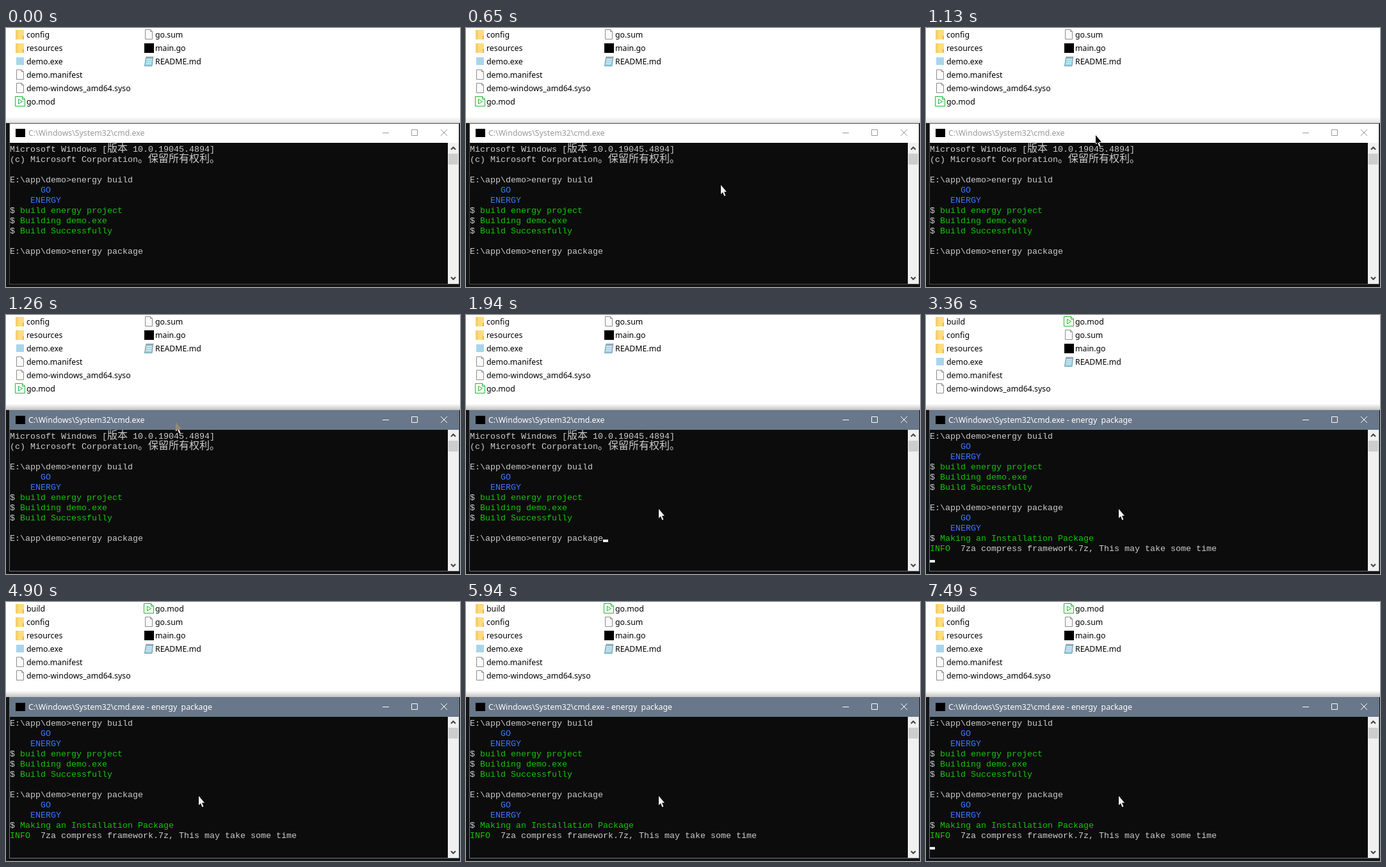
These frames come from a looping animation (709x406 px, 8 s). An HTML page:

```html
<!DOCTYPE html>
<html lang="zh-CN">
<head>
<meta charset="utf-8">
<title>Terminal packaging</title>
<style>
  html, body { margin: 0; width: 100%; height: 100%; overflow: hidden; background: #fff; }
  svg { display: block; }
  text { white-space: pre; }
  .ui { font: 12.32px "Noto Sans", "Open Sans", sans-serif; }
  .con { font: 13.333px "Liberation Mono", "Courier New", monospace; fill: #ccc; }
  .cjk { font: 300 16px "Noto Sans CJK SC", "Noto Sans CJK", sans-serif; }
  .green { fill: #16c60c; }
  .blue { fill: #3b78ff; }
  .cursor { fill: #fff; mix-blend-mode: difference; }
</style>
</head>
<body>
<svg id="stage" width="709" height="406" viewBox="0 0 709 406"></svg>
<script>
const LOOP = 8000;
const ACTIVE = 1260, ENTER = 2670, REFRESH = 3360;
const PRINTS = [2760, 2850, 2940, 3290];
const BLINKS = [1800, 2340, ENTER, 3840, 4370, 4900, 5430, 5940, 6470, 7020, 7490];

const rect = (x, y, w, h, fill, extra = '') =>
  `<rect x="${x}" y="${y}" width="${w}" height="${h}" fill="${fill}" ${extra}/>`;
const path = (d, stroke, fill = 'none', extra = '') =>
  `<path d="${d}" stroke="${stroke}" fill="${fill}" ${extra}/>`;
const label = (x, y, s, fill = '#000') => `<text class="ui" x="${x}" y="${y}" fill="${fill}">${s}</text>`;
const span = (cls, s) => `<tspan class="${cls}">${s}</tspan>`;
const passed = (times, t) => times.filter(at => t >= at).length;

// Icons sit in a 16 by 16 cell
const ICONS = {
  folder: rect(1, 1, 13, 15, '#ffdc7c') + rect(1, 1, 4, 15, '#f7d069') + rect(12, 10, 2, 6, '#e9b94a'),
  page: path('M2.5 .5H10.5L13.5 3.5V15.5H2.5Z', '#8c8c8c', '#fafafa') + path('M10.5 .5V3.5H13.5', '#8c8c8c'),
  app: rect(2, 2, 12, 12, '#a9d5ea'),
  code: rect(1, 1, 15, 15, '#000'),
  play: path('M.5 .5H11.5L15.5 4.5V15.5H.5Z', '#25b532', '#fff') +
    path('M11.5 .5V4.5H15.5', '#25b532') + path('M5.5 4.5V12L11.5 8.2Z', '#25b532'),
  note: path('M3.5 2.5H14.5L13 15.5H1.5Z', '#6f98a8', '#9fd3e6') +
    path('M4 5.5H13M4 8.5H12.5M3.5 11.5H12', '#e2f3f8') +
    path('M4 1.5H15', '#777', 'none', 'stroke-dasharray="1 1" stroke-width="2"')
};

const FILES = [
  ['folder', 'config'], ['folder', 'resources'], ['app', 'demo.exe'],
  ['page', 'demo.manifest'], ['page', 'demo-windows_amd64.syso'], ['play', 'go.mod'],
  ['page', 'go.sum'], ['code', 'main.go'], ['note', 'README.md']
];

const step = s => '$ ' + span('green', s);
const BANNER = [span('blue', '      GO'), span('blue', '    ENERGY')];
const LOG = [
  `Microsoft Windows [${span('cjk', '版本')} 10.0.19045.4894]`,
  `(c) Microsoft Corporation${span('cjk', '。保留所有权利。')}`,
  '',
  'E:\\app\\demo&gt;energy build',
  ...BANNER,
  step('build energy project'),
  step('Building demo.exe'),
  step('Build Successfully'),
  '',
  'E:\\app\\demo&gt;energy package',
  ...BANNER,
  step('Making an Installation Package'),
  span('green', 'INFO') + '  7za compress framework.7z, This may take some time'
];

function explorer(t) {
  const files = t >= REFRESH ? [['folder', 'build'], ...FILES] : FILES;
  return files.map(([icon, name], i) => {
    const x = 14 + 201 * Math.floor(i / 6), y = 2 + 21 * (i % 6);
    return `<g transform="translate(${x} ${y})">${ICONS[icon]}</g>` + label(x + 18, y + 13, name);
  }).join('');
}

function frame(t) {
  const active = t >= ACTIVE;
  const bar = active ? '#687789' : '#fff', ink = active ? '#fff' : '#999';
  const edge = active ? '#687789' : '#4a4a4a';
  const title = 'C:\\Windows\\System32\\cmd.exe' + (t >= ENTER ? ' - energy  package' : '');
  const shadow = `<linearGradient id="shadow" x2="0" y2="1"><stop stop-opacity="0"/>` +
    `<stop offset="1" stop-opacity="${active ? .24 : .12}"/></linearGradient>`;
  return shadow + rect(0, 139, 709, 10, 'url(#shadow)') +
    rect(0, 149, 709, 257, '#141414') +
    rect(5.5, 149.5, 702, 252, '#0c0c0c', `stroke="${edge}"`) +
    rect(6, 150, 701, 30, bar) +
    rect(15, 158, 15, 13, '#000') +
    label(35, 169, title, ink) +
    path('M588 164.5H598M633.5 159.5H642.5V168.5H633.5ZM679 159L689 169M689 159L679 169', ink) +
    rect(690, 180, 17, 221, '#f0f0f0') +
    rect(691, 197, 15, 17, '#cdcdcd') +
    path('M695 190.5L698.5 187L702 190.5M695 390.5L698.5 394L702 390.5', '#404040', 'none', 'stroke-width="2"');
}

function terminal(t) {
  const shown = 11 + passed(PRINTS, t);
  const typing = t < ENTER;
  const caretLine = typing ? 10 : shown;
  const top = Math.max(0, caretLine - 12);
  const lines = LOG.slice(top, shown).map((s, i) =>
    `<text class="con" x="6" y="${194 + 16 * i}">${s}</text>`).join('');
  const caretOn = passed(BLINKS, t) % 2;
  return lines + (caretOn ? rect(typing ? 214 : 6, 192 + 16 * (caretLine - top), 8, 4, '#f2f2f2') : '');
}

// Pointer position, sampled in even steps like a screen recorder
function glide(t, start, gap, steps, from, to, ease) {
  const k = Math.min(1, Math.max(0, Math.floor((t - start) / gap + 1e-6) / steps));
  return from.map((v, i) => Math.round(v + (to[i] - v) * ease(k)));
}

function pointer(t) {
  if (t < 250) return '';
  const [x, y] = t < 1520
    ? glide(t, 250, 820 / 12, 12, [655, 396], [265, 168], k => 1 - (1 - k) ** 2)
    : glide(t, 1520, 70, 6, [265, 168], [301, 304], k => k * k * (3 - 2 * k));
  return `<path class="cursor" transform="translate(${x} ${y})" d="M0 0V14.5L3 11.6L5.4 17.5L7.4 16.6L5 10.8H9Z"/>`;
}

const stage = document.getElementById('stage');
let last = '';
function tick() {
  const t = performance.now() % LOOP;
  const picture = rect(0, 0, 709, 406, '#fff') + explorer(t) + frame(t) + terminal(t) + pointer(t);
  if (picture !== last) stage.innerHTML = last = picture;
  requestAnimationFrame(tick);
}
tick();
</script>
</body>
</html>
```
